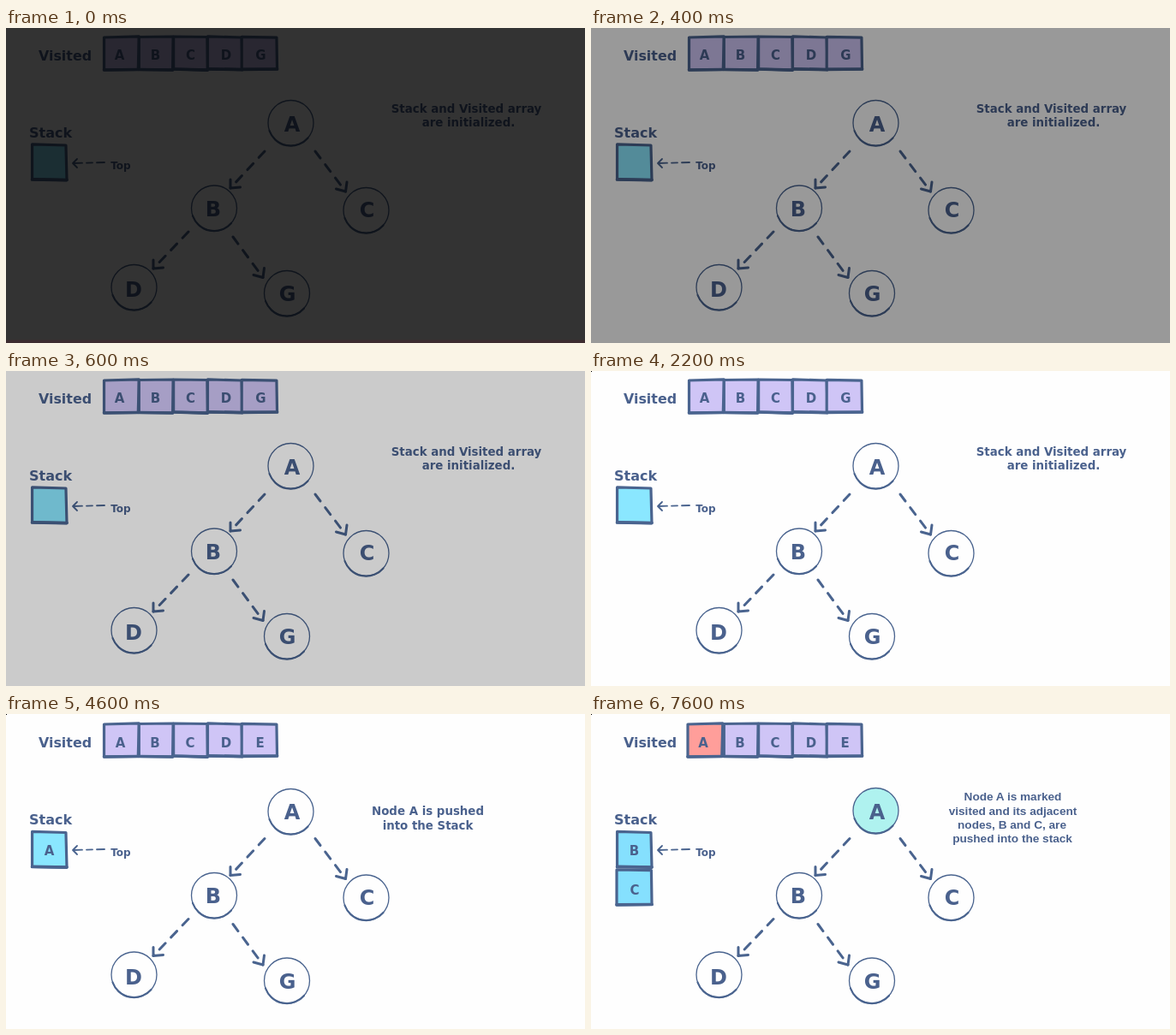
An HTML page that plays this animation: 676 px wide and 368 px high, repeating every 8000 ms.

```html
<!DOCTYPE html>
<html lang="en">
<head>
<meta charset="utf-8">
<title>Depth-first traversal</title>
<style>
  html, body { margin: 0; width: 100%; height: 100%; overflow: hidden; background: #fefefe; }
  svg { display: block; width: 676px; height: 368px; }
  text { font-family: "DejaVu Sans", Verdana, sans-serif; font-weight: 700; fill: #4a618d; text-anchor: middle; }
  .note { font-size: 13.36px; }
  .sans { font: 700 13.6px "Liberation Sans", Arial, sans-serif; }
  .ink { stroke: #4a648f; fill: none; stroke-linecap: round; stroke-linejoin: round; }
  .scene, #shade, #edge, #dot { animation: 8s step-end infinite; }
  #init { animation-name: init; }
  #push { animation-name: push; }
  #visit { animation-name: visit; }
  #shade { animation-name: shade; }
  #edge { animation-name: edge; }
  #dot { animation-name: dot; }
  @keyframes init { 0% { visibility: visible } 57.5%, 100% { visibility: hidden } }
  @keyframes push { 0% { visibility: hidden } 57.5% { visibility: visible } 92.5%, 100% { visibility: hidden } }
  @keyframes visit { 0% { visibility: hidden } 92.5%, 100% { visibility: visible } }
  @keyframes shade { 0% { opacity: .8 } 2.5% { opacity: .6 } 5% { opacity: .4 } 7.5% { opacity: .2 } 10%, 100% { opacity: 0 } }
  @keyframes edge { 0% { opacity: .35 } 2.5% { opacity: .1 } 5%, 100% { opacity: 0 } }
  @keyframes dot { 0% { opacity: 0 } 15%, 100% { opacity: 1 } }
</style>
</head>
<body>
<svg viewBox="0 0 676 368">
  <rect width="676" height="368" fill="#fefefe"/>
  <g id="init" class="scene"></g>
  <g id="push" class="scene"></g>
  <g id="visit" class="scene"></g>
  <rect id="shade" width="676" height="368"/>
  <rect id="edge" y="364.5" width="676" height="3.5" fill="#501e2c"/>
  <rect id="dot" width="1" height="1"/>
</svg>
<script>
const label = (s, x, y, size) => `<text x="${x}" y="${y}" font-size="${size}">${s}</text>`;
const stroke = (d, width, extra = '') => `<path class="ink" d="${d}" stroke-width="${width}" ${extra}/>`;

// Hand-drawn box: corners drift slightly, the bottom edge is heavier.
function box(x, y, w, h, fill, seed) {
  const drift = k => Math.sin(seed * 7.3 + k * 2.1) * 0.6;
  const pts = [[x, y], [x + w, y], [x + w, y + h], [x, y + h]]
    .map(([px, py], k) => [px + drift(k), py + drift(k + 4)]);
  const [, , c, d] = pts;
  return `<path class="ink" d="M${pts.join('L')}Z" style="fill:${fill}" stroke-width="3.2"/>` +
    stroke(`M${d}L${c}`, 3.7);
}

function node(x, y, name, labelX, labelY, fill = 'none') {
  const r = 26.5;
  return `<circle class="ink" cx="${x}" cy="${y}" r="${r}" style="fill:${fill}" stroke-width="1.3"/>` +
    stroke(`M${x - 25},${y + 9}A${r},${r} 0 0 0 ${x + 20},${y + 17.5}`, 2.2) +
    label(name, labelX, labelY, 24);
}

// Dashed shaft plus a head whose arms are offsets from the tip.
function arrow(x1, y1, x2, y2, arm1, arm2) {
  const at = ([dx, dy]) => `${x2 + dx},${y2 + dy}`;
  return stroke(`M${x1},${y1}L${x2},${y2}`, 3, 'stroke-dasharray="10 9.5"') +
    stroke(`M${at(arm1)}L${x2},${y2}L${at(arm2)}`, 3);
}

function scene(id, { shift, letters, letterX, stack, note, noteClass = 'note', visited }) {
  const s = shift, tall = s * 1.5;
  const left = [[0, -10], [11.5, -1]], right = [[-11, -3], [1.5, -11]];
  let out = label('Visited', 69, 38 + s * 1.3, 15.9) + label('Stack', 52, 128 + s, 16) +
    label('Top', 134, 164.5 + s, 12);

  [...letters].forEach((c, i) => {
    const marked = visited && i === 0;
    out += box(114.5 + 40.3 * i - (marked ? 1.5 : 0), 10.5 + s, 40.3, 38, marked ? '#ff9e9a' : '#cfc5f6', i) +
      label(c, letterX[i], 37 + 2 * s, 15);
  });
  stack.forEach((c, i) => {
    out += box(30.5, 136.5 + tall + 44 * i, 40, 41, visited ? '#85e0fe' : '#8ae7ff', i + 3) +
      label(c, 50.5 + i * .5, 163 + tall + 46 * i, 15);
  });
  out += stroke(`M83,${153 + s}L78,${158 + s}L83,${163 + s}`, 1.8) +
    stroke(`M79,${158 + s}L115,${157 + s}`, 1.8, 'stroke-dasharray="10 5 7 5"');

  out += node(332.5, 111 + (visited ? 2 : 3 * s), 'A', 334, 121.3 + tall, visited ? '#aff2ef' : 'none') +
    node(243, 210.5 + tall, 'B', 242, 220 + s, 'none') +
    node(420.5, 213 + tall, 'C', 421.5, 221 + 2 * s) +
    node(149.5, 303 + tall, 'D', 149, 314 + tall) +
    node(328, 310 + tall, 'G', 328.5, 319 + 2 * s);
  out += arrow(302, 144 + tall, 262, 187 + tall, ...left) +
    arrow(361, 144 + tall, 396.5, 191 + tall, ...right) +
    arrow(213, 238 + tall, 172, 281 + tall, ...left) +
    arrow(265, 244 + tall, 300, 291.5 + tall, ...right);

  out += note.map(([text, x, y]) => `<text class="${noteClass}" x="${x}" y="${y}">${text}</text>`).join('');
  document.getElementById(id).innerHTML = out;
}

const laterX = [133.5, 174, 215, 257, 296.5];
scene('init', {
  shift: 0, letters: 'ABCDG', letterX: [132.5, 174.5, 215.5, 257, 297.5], stack: [''],
  note: [['Stack and Visited array', 537.5, 99], ['are initialized.', 540, 115]]
});
scene('push', {
  shift: 1, letters: 'ABCDE', letterX: laterX, stack: ['A'],
  note: [['Node A is pushed', 492.5, 118], ['into the Stack', 492.5, 134.7]]
});
scene('visit', {
  shift: 1, letters: 'ABCDE', letterX: [131, ...laterX.slice(1)], stack: ['B', 'C'], visited: true,
  noteClass: 'sans',
  note: [['Node A is marked', 492.5, 101.3], ['visited and its adjacent', 492.5, 117.8],
    ['nodes, B and C, are', 491.5, 133.8], ['pushed into the stack', 492, 150]]
});
</script>
</body>
</html>
```
